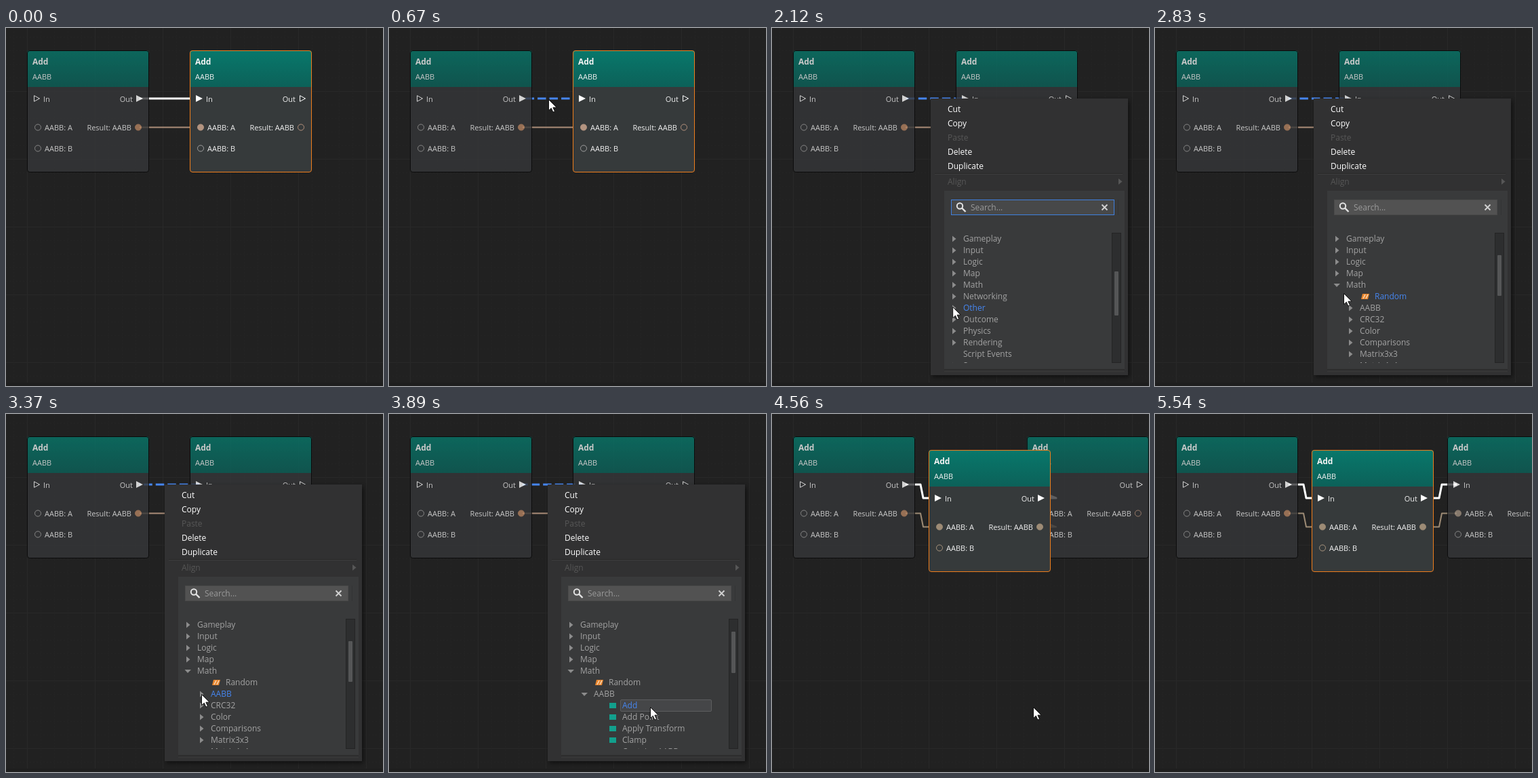
An HTML page that plays this animation: 556x528 px, repeating every 5820 ms.

```html
<!DOCTYPE html>
<html lang="en">
<head>
<meta charset="utf-8">
<title>Insert a node on a wire</title>
<style>
html, body { margin: 0; width: 100%; height: 100%; overflow: hidden; background: #212121; }
svg { display: block; width: 556px; height: 528px; font-family: "Open Sans", "Noto Sans", sans-serif; }
</style>
</head>
<body>
<svg id="stage" viewBox="0 0 556 528" xmlns="http://www.w3.org/2000/svg">
  <defs>
    <linearGradient id="head" x1="0" y1="0" x2="0" y2="1">
      <stop offset="0" stop-color="#08786b"/><stop offset="1" stop-color="#0c6159"/>
    </linearGradient>
    <clipPath id="list"><rect x="254" y="302" width="246" height="192"/></clipPath>
    <filter id="blur" x="-10%" y="-10%" width="120%" height="120%"><feGaussianBlur stdDeviation="3"/></filter>
  </defs>
  <rect width="556" height="528" fill="#212121"/>
  <g id="grid" fill="none"></g>
  <g id="wires" fill="none" stroke-linejoin="round"></g>
  <g id="first"></g>
  <g id="second"></g>
  <g id="added"></g>
  <g id="menu"></g>
  <path id="cursor" d="M0 0V16.2L3.8 12.7L6.4 18.6L9 17.4L6.4 11.7H11.6Z" fill="#fff" stroke="#111" stroke-width="1"/>
</svg>
<script>
const LOOP = 5820;
const T = { enter: 110, hover: 560, menu: 860, math: 2600, aabb: 3400, pick: 3800, insert: 4280, slide: 4316, settle: 4690, exit: 5530 };
const BLUE = '#4686f0';

// time, x, y of the pointer tip
const PATH = [
  [110, 330, 472], [560, 235, 105], [980, 235, 105], [1290, 246, 180], [1420, 253, 199],
  [1880, 264, 398], [2050, 266, 414], [2450, 268, 378], [2650, 268, 378], [2830, 278, 391],
  [3180, 288, 413], [3480, 288, 413], [3860, 385, 432], [5060, 385, 432], [5540, 456, 530]
];

const $ = id => document.getElementById(id);
const cache = {};
function put(id, html) {
  if (cache[id] !== html) $(id).innerHTML = cache[id] = html;
}

function text(x, y, s, fill = '#f0f0f0', size = 12, more = '') {
  return `<text x="${x}" y="${y}" font-size="${size}" fill="${fill}" ${more}>${s}</text>`;
}
function box(x, y, w, h, fill, more = '') {
  return `<rect x="${x}" y="${y}" width="${w}" height="${h}" fill="${fill}" ${more}/>`;
}
function line(d, stroke, width = 1, more = '') {
  return `<path d="${d}" stroke="${stroke}" stroke-width="${width}" fill="none" ${more}/>`;
}

function grid() {
  let minor = '', major = '';
  for (let x = 11.5; x < 556; x += 20) minor += `M${x} 0V528`;
  for (let y = 13.5; y < 528; y += 20) minor += `M0 ${y}H556`;
  for (let x = 31.5; x < 556; x += 100) major += `M${x} 0V528`;
  for (let y = 93.5; y < 528; y += 100) major += `M0 ${y}H556`;
  return line(minor, '#242424', 1, 'stroke-dasharray="2 3"') + line(major, '#282828') +
    box(0, 523, 556, 5, '#1e1e1e');
}

function execPort(x, on) {
  return on
    ? `<path d="M${x - 1} 66V76L${x + 9} 71Z" fill="#fff"/>`
    : `<path d="M${x + .5} 66.7V75.3L${x + 8.5} 71Z" fill="none" stroke="#fff"/>`;
}
function dataPort(x, y, on, color) {
  return `<circle cx="${x}" cy="${y}" r="4.5" fill="${on ? color : 'none'}" stroke="${color}"/>`;
}

function node({ selected, ins, outs, tan, result, empty = '#a0a0a0' }) {
  const edge = selected ? '#ee7d1c' : '#060606';
  const body = box(.5, .5, 179, 179, selected ? '#363a3b' : '#363739', 'rx="3.5"') +
    '<path d="M0 54V4Q0 0 4 0H176Q180 0 180 4V54Z" fill="url(#head)"/>';
  const end = 'text-anchor="end"';
  return `<g opacity="${selected ? 1 : .8}">` + body +
    box(.5, .5, 179, 179, 'none', `rx="3.5" stroke="${edge}"`) +
    text(8, 21, 'Add', '#f4f4f4', 12, 'font-weight="bold"') +
    text(8, 43, 'AABB', '#f0f0f0', 11) +
    execPort(10, ins) + text(24, 75.5, 'In', '#f0f0f0', 11) +
    text(156, 75.5, 'Out', '#f0f0f0', 11, end) + execPort(162, outs) +
    dataPort(16, 113.5, ins, ins ? tan : empty) + text(26, 118, 'AABB: A', '#f0f0f0', 11) +
    text(154, 118, 'Result: AABB', '#f0f0f0', 11, end) + dataPort(164, 113.5, outs, result) +
    dataPort(16, 144.5, false, empty) + text(26, 149, 'AABB: B', '#f0f0f0', 11) + '</g>';
}

// wire between two nodes given their left tops; row is the port height
function wire(a, b, row, color, width) {
  const ay = a[1] + row, by = b[1] + row;
  return line(`M${a[0] + 166} ${ay}H${a[0] + 188}L${b[0] - 8} ${by}H${b[0] + 14}`, color, width);
}

function wires(t, x) {
  const one = [31, 33], two = [x, 33], mid = [231, 53];
  if (t < T.insert) {
    const start = 188.2 + .046 * t;
    const exec = t < T.hover
      ? line('M197 104H285', '#fff', 3)
      : line('M197 104H285', BLUE, 3, `stroke-dasharray="12.5 5" stroke-dashoffset="${(197 - start).toFixed(2)}"`);
    return exec + wire(one, two, 113.5, '#ab8d79', 2);
  }
  return [[one, mid], [mid, two]].map(([a, b]) =>
    wire(a, b, 71, '#fff', 3) + wire(a, b, 113.5, '#9d8b75', 2)).join('');
}

// kind: + closed branch, - open branch, r and f leaves with an icon, blank plain
function rows(t) {
  const list = ['Gameplay', 'Input', 'Logic', 'Map', 'Math'].map(s => [s, '+', 0]);
  if (t >= T.math) {
    list[4][1] = '-';
    list.push(['Random', 'r', 1], ['AABB', t >= T.aabb ? '-' : '+', 1]);
    if (t >= T.aabb)
      ['Add', 'Add Point', 'Apply Transform', 'Clamp', 'Contains AABB'].forEach(s => list.push([s, 'f', 2]));
    else
      ['CRC32', 'Color', 'Comparisons', 'Matrix3x3', 'Matrix4x4'].forEach(s => list.push([s, '+', 1]));
  } else {
    ['Networking', 'Other', 'Outcome', 'Physics', 'Rendering'].forEach(s => list.push([s, '+', 0]));
    list.push(['Script Events', '', 0], ['Spawn', '+', 0]);
  }
  return list;
}

function treeRow([label, kind, depth], i, t, cy) {
  const y = 311 + 17 * i, leaf = kind === 'r' || kind === 'f';
  const x = 268 + 20 * depth + (leaf ? 22 : 0);
  const hot = cy >= y - 8 && cy < y + 9 && cy > 302;
  let out = '';
  if (kind === '+') out += `<path d="M${x - 2} ${y - 4.5}V${y + 4.5}L${x + 3.5} ${y}Z" fill="#8c8c8c"/>`;
  if (kind === '-') out += `<path d="M${x - 4.5} ${y - 2}H${x + 5}L${x} ${y + 3}Z" fill="#8c8c8c"/>`;
  if (kind === 'f') out += box(x - 5, y - 4, 10, 8, '#12a08d');
  if (kind === 'r')
    out += `<path d="M${x - 4} ${y - 4}H${x + 6}L${x + 4} ${y + 4}H${x - 6}Z" fill="#e8862e"/>` +
      line(`M${x - 3} ${y + 3}L${x} ${y - 3}M${x + 1} ${y + 3}L${x + 4} ${y - 3}`, '#f7d9b8', 1.5);
  const tx = x + 14;
  if (hot && kind === 'f' && t >= T.pick)
    out += box(tx - 2.5, y - 8.5, 134, 17, '#454648', 'rx="1.5" stroke="#5c5d5f"');
  return out + text(tx, y + 4, label, hot ? BLUE : '#a3a3a3');
}

function menu(t, cy) {
  const focus = t < T.math;
  const thumb = focus ? [359, 65] : t < T.aabb ? [335, 60] : [321, 61];
  const items = ['Cut', 'Copy', 'Paste', 'Delete', 'Duplicate'].map((s, i) => {
    const y = 120 + 21 * i, hot = cy >= y - 10 && cy < y + 11;
    return text(259, y + 4, s, s === 'Paste' ? '#575757' : hot ? BLUE : '#fff');
  }).join('');
  return box(236, 107, 291, 408, '#000', 'opacity=".5" filter="url(#blur)"') +
    box(234, 104, 291, 408, '#313132') + items +
    line('M240 214.5H517', '#262626') + line('M240 215.5H517', '#3e3e3e') +
    text(259, 231, 'Align', '#575757') +
    '<path d="M511 222V231L516.500 226.500Z" fill="#575757"/>' +
    box(254, 240, 266, 263, '#393a3b') +
    line('M254 503.500H520', '#2a2a2a') + line('M254 506.500H520', '#3a3a3a') +
    box(264.5, 253.5, 240, 22, focus ? '#474849' : '#525252', `stroke="${focus ? '#4080de' : '#4a4a4a'}"`) +
    line('M510.500 253V276', '#333435') +
    '<circle cx="277" cy="262.500" r="4.200" fill="none" stroke="#e4e4e4" stroke-width="2"/>' +
    line('M280 265.500L285.500 271', '#e4e4e4', 2.4) +
    text(293, 269, 'Search...', '#9a9a9a') +
    line('M486.500 260.500L494.500 268.500M494.500 260.500L486.500 268.500', '#cfcfcf', 2) +
    '<g clip-path="url(#list)">' + rows(t).map((r, i) => treeRow(r, i, t, cy)).join('') + '</g>' +
    box(501.5, 302.5, 13, 191, '#2d2e2f', 'stroke="#242424"') +
    box(505, thumb[0], 6, thumb[1], '#555657', 'rx="1"');
}

function pointer(t) {
  let i = 1;
  while (i < PATH.length - 1 && PATH[i][0] < t) i++;
  const [t0, x0, y0] = PATH[i - 1], [t1, x1, y1] = PATH[i];
  const k = Math.min(1, Math.max(0, (t - t0) / (t1 - t0)));
  const e = k * k * (3 - 2 * k);
  return [x0 + (x1 - x0) * e, y0 + (y1 - y0) * e];
}

function draw(t) {
  const [cx, cy] = pointer(t);
  const slide = Math.min(1, Math.max(0, (t - T.slide) / (T.settle - T.slide)));
  const x = 271 + 160 * slide;
  const inserted = t >= T.insert, open = t >= T.menu && !inserted;

  put('wires', wires(t, x));
  put('second', node({ selected: t < T.menu, ins: true, outs: false, tan: inserted ? '#a09080' : '#b39480', result: '#b5917c' }));
  $('second').setAttribute('transform', `translate(${x.toFixed(2)} 33)`);
  $('added').style.display = inserted ? '' : 'none';
  $('menu').style.display = open ? '' : 'none';
  if (open) put('menu', menu(t, cy));
  $('cursor').style.display = t >= T.enter && t < T.exit ? '' : 'none';
  $('cursor').setAttribute('transform', `translate(${(cx + .5).toFixed(2)} ${(cy + .5).toFixed(2)})`);
}

put('grid', grid());
put('first', node({ ins: false, outs: true, tan: '#b39480', result: '#b58462' }));
$('first').setAttribute('transform', 'translate(31 33)');
put('added', node({ selected: true, ins: true, outs: true, tan: '#9d8b75', result: '#9d8b75', empty: '#a9957e' }));
$('added').setAttribute('transform', 'translate(231 53)');

const began = performance.now();
function tick() {
  draw((performance.now() - began) % LOOP);
  requestAnimationFrame(tick);
}
tick();
</script>
</body>
</html>
```
